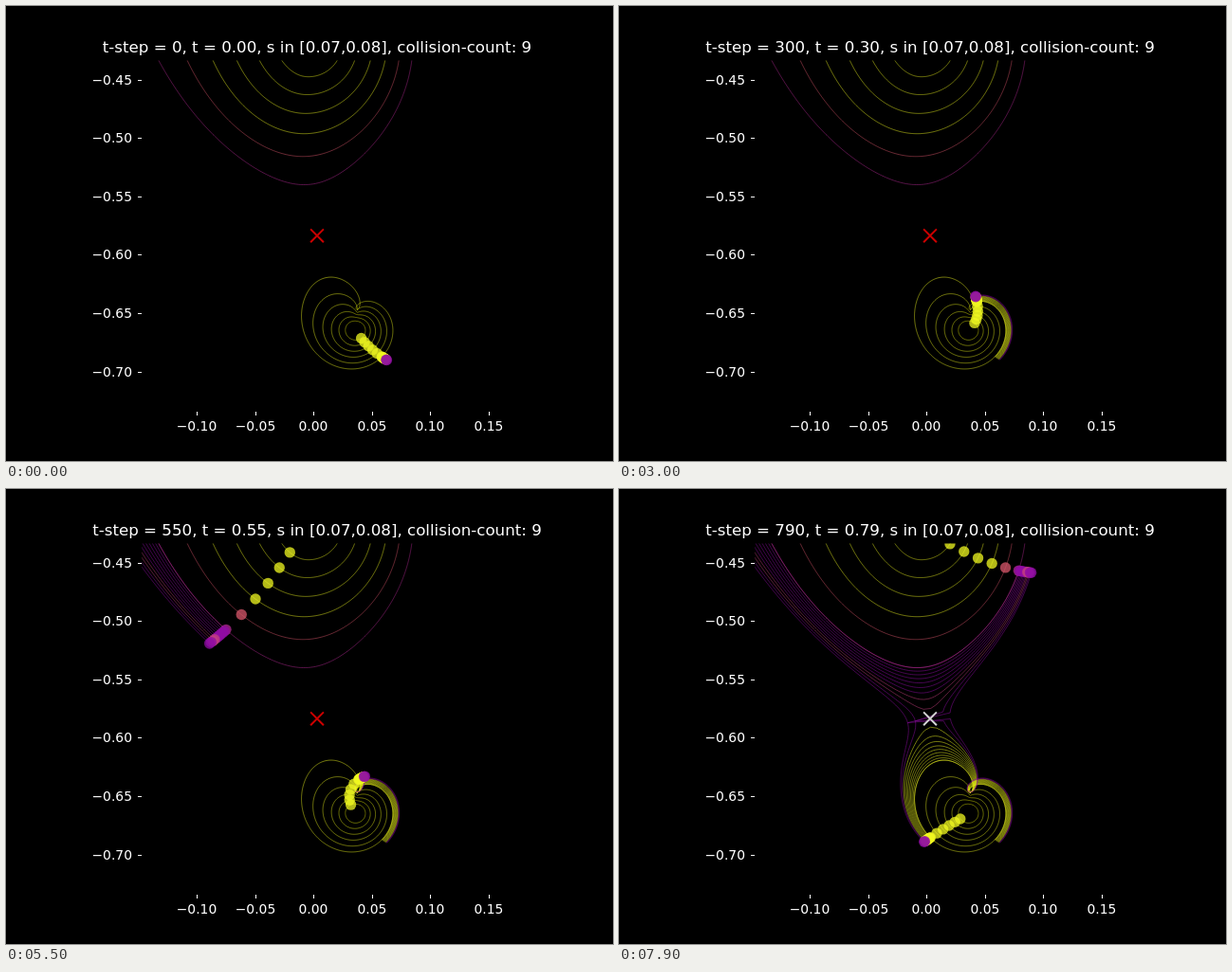
These frames come from a looping animation (640 px wide and 480 px high, 8 s). An HTML page with a canvas:

```html
<!DOCTYPE html>
<html lang="en">
<head>
<meta charset="utf-8">
<title>Root paths</title>
<style>
  html, body { margin: 0; width: 640px; height: 480px; overflow: hidden; background: #000; }
  canvas, svg { position: absolute; left: 0; top: 0; width: 640px; height: 480px; }
  text { fill: #fff; font: 13.889px "DejaVu Sans", sans-serif; }
  #title { font-size: 16.667px; text-anchor: middle; }
  .x { text-anchor: middle; }
  .y { text-anchor: end; }
</style>
</head>
<body>
<canvas id="plot" width="640" height="480"></canvas>
<svg id="labels" viewBox="0 0 640 480"><text id="title" x="328" y="49"></text></svg>
<script>
const FRAME_MS = 100, FRAMES = 80, LEVELS = 16;
const AXES = { x: 143.2, y: 57.6, w: 369.6, h: 369.6 };
const YELLOW = '#f0f921', RED = '#d8576b', PINK = '#c5407e', MAGENTA = '#b02991', PURPLE = '#900da4';
const TAU = 2 * Math.PI, DEG = Math.PI / 180;

// The two roots collide at this strength and time, at this place
const HIT = { s: .0783, t: .627, x: 328, y: 242.3 };

// Visible time span of each root
const lower = { start: 0, end: 1 };
const upper = { start: .42, end: .87 };

const strength = k => k <= 5 ? .02 + .01 * k : .07 + .001 * (k - 5);

// Roots of a quadratic: midpoint plus or minus g * sqrt(1 - w / w0), with w = s * exp(2 pi i t)
function position(root, k, t) {
  const s = strength(k), r = s / .07, q = s / HIT.s;
  const a = TAU * t, phi = TAU * (t - HIT.t);

  const re = 56 + 13.5 * r * Math.cos(a - 85 * DEG);
  const im = 23.2 + 3 * r * Math.cos(a - 100 * DEG);
  const midX = 344.5 + r * (re * Math.cos(a) - im * Math.sin(a));
  const midY = 190 - r * (re * Math.sin(a) + im * Math.cos(a));

  const zx = 1 - q * Math.cos(phi), zy = -q * Math.sin(phi);
  let size = 153.5 * Math.sqrt(Math.hypot(zx, zy));
  let dir = 99.2 * DEG + Math.atan2(zy, zx) / 2;
  if (q > 1 && phi > 0) dir += Math.PI; // past the collision the roots trade places
  if (root === lower) {
    dir += Math.PI;
  } else {
    const lead = Math.max(0, -phi) ** 2;
    size *= 1 + .07 * lead;
    dir += .09 * r ** 3 * lead;
  }
  return [midX + size * Math.cos(dir), midY - size * Math.sin(dir)];
}

function colour(root, k) {
  if (k > 13) return PURPLE;
  if (root === lower || k < 4) return YELLOW;
  if (k === 4) return RED;
  if (k === 5) return MAGENTA;
  return k > 11 ? PINK : PURPLE;
}

const ctx = document.getElementById('plot').getContext('2d');

function trace(root, k, end) {
  const span = end - root.start;
  if (span <= 0) return;
  const steps = Math.ceil(span * 1000);
  ctx.beginPath();
  for (let i = 0; i <= steps; i++) ctx.lineTo(...position(root, k, root.start + span * i / steps));
  ctx.strokeStyle = colour(root, k);
  ctx.lineWidth = .66;
  ctx.stroke();
}

function dot(root, k, t) {
  if (t < root.start) return;
  ctx.beginPath();
  ctx.arc(...position(root, k, t), 5.7, 0, TAU);
  ctx.fillStyle = colour(root, k);
  ctx.fill();
}

function cross(t) {
  const { x, y } = HIT, r = 6.9;
  ctx.beginPath();
  ctx.moveTo(x - r, y - r);
  ctx.lineTo(x + r, y + r);
  ctx.moveTo(x - r, y + r);
  ctx.lineTo(x + r, y - r);
  ctx.strokeStyle = t < HIT.t ? '#cc0000' : '#d3d3d3';
  ctx.lineWidth = 2;
  ctx.stroke();
}

const title = document.getElementById('title'), labels = document.getElementById('labels');

function draw(frame) {
  const t = frame / 100;
  title.textContent = `t-step = ${frame * 10}, t = ${t.toFixed(2)}, s in [0.07,0.08], collision-count: 9`;
  ctx.clearRect(0, 0, 640, 480);
  ctx.save();
  ctx.beginPath();
  ctx.rect(AXES.x, AXES.y, AXES.w, AXES.h);
  ctx.clip();
  ctx.globalAlpha = .75;
  for (const root of [upper, lower]) {
    for (let k = 0; k <= 5; k++) trace(root, k, root.end);
    for (let k = 5; k < LEVELS; k++) trace(root, k, t);
  }
  for (let k = 0; k < LEVELS; k++) {
    dot(upper, k, t);
    dot(lower, k, t);
  }
  ctx.globalAlpha = 1;
  cross(t);
  ctx.restore();
}

function add(name, attrs, text = '') {
  const el = document.createElementNS('http://www.w3.org/2000/svg', name);
  for (const a in attrs) el.setAttribute(a, attrs[a]);
  el.textContent = text;
  labels.append(el);
}

const number = v => v.toFixed(2).replace('-', '\u2212');
for (let i = 0; i < 6; i++) {
  const x = Math.round(201 + 61.6 * i), y = Math.round(77.6 + 61.6 * i);
  add('rect', { x, y: 428, width: 1, height: 4, fill: '#fff' });
  add('rect', { x: 139, y, width: 4, height: 1, fill: '#fff' });
  add('text', { x, y: 448, class: 'x' }, number((i - 2) / 20));
  add('text', { x: 133, y: y + 5, class: 'y' }, number(-.45 - i / 20));
}

let shown = -1;
const began = performance.now();
function tick() {
  const frame = Math.floor((performance.now() - began) / FRAME_MS) % FRAMES;
  if (frame !== shown) draw(shown = frame);
  requestAnimationFrame(tick);
}
tick();
</script>
</body>
</html>
```
